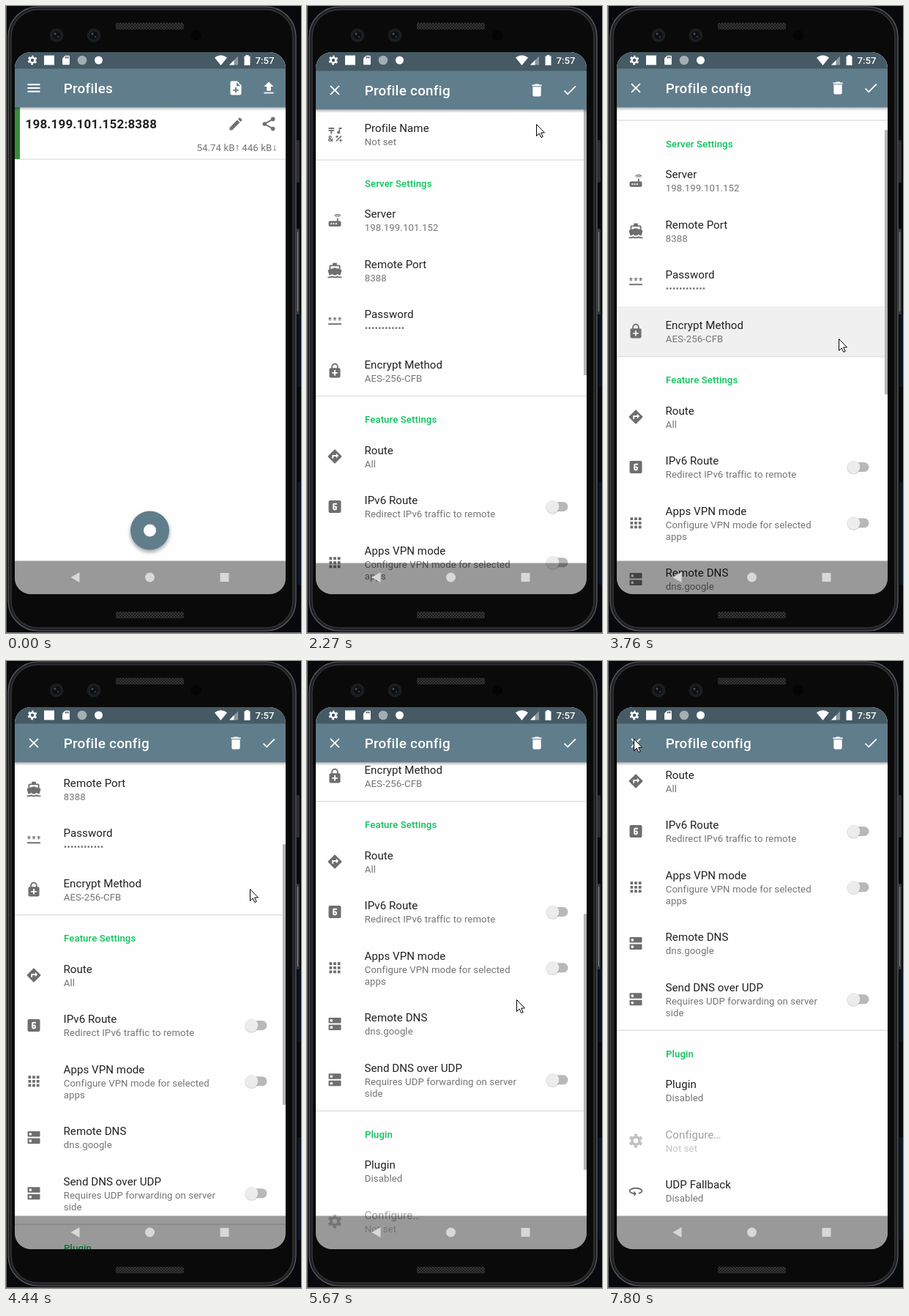
An HTML page that plays this animation: 403 by 856 pixels, repeating every 8 s.

```html
<!DOCTYPE html>
<html lang="en">
<head>
<meta charset="utf-8">
<title>Profile config</title>
<style>
html, body { margin: 0; width: 100%; height: 100%; overflow: hidden; background: #08090c; }
svg { display: block; width: 403px; height: 856px; }
text { font-family: Roboto, sans-serif; white-space: pre; }
.bar { font-size: 18.84px; font-weight: 500; letter-spacing: .27px; fill: #fff; }
.title { font-size: 15.07px; letter-spacing: .06px; fill: #212121; }
.sub { font-size: 13.19px; letter-spacing: .09px; fill: #757575; }
.head { font-size: 13.19px; font-weight: 500; letter-spacing: .1px; fill: #0cc15b; }
.host { font-size: 17px; font-weight: 700; letter-spacing: .2px; fill: #212121; }
.time { font-size: 13.2px; font-weight: 500; fill: #fff; }
</style>
</head>
<body>
<svg id="stage" viewBox="0 0 403 856"></svg>
<script>
// Icons on a 24-unit grid: path data, or markup when it starts with "<"
const icons = {
  menu: 'M3 18h18v-2H3zm0-5h18v-2H3zm0-7v2h18V6z',
  close: 'M19 6.41L17.59 5 12 10.59 6.41 5 5 6.41 10.59 12 5 17.59 6.41 19 12 13.41 17.59 19 19 17.59 13.41 12z',
  trash: 'M6 19c0 1.1.9 2 2 2h8c1.1 0 2-.9 2-2V7H6zM19 4h-3.5l-1-1h-5l-1 1H5v2h14z',
  check: 'M9 16.17L4.83 12l-1.42 1.41L9 19 21 7l-1.41-1.41z',
  add: 'M14 2H6c-1.1 0-2 .9-2 2v16c0 1.1.9 2 2 2h12c1.1 0 2-.9 2-2V8zm2 14h-3v3h-2v-3H8v-2h3v-3h2v3h3zm-3-7V3.5L18.5 9z',
  upload: 'M9 16h6v-6h4l-7-7-7 7h4zm-4 2h14v2H5z',
  edit: 'M3 17.25V21h3.75L17.81 9.94l-3.75-3.75zM20.71 7.04c.39-.39.39-1.02 0-1.41l-2.34-2.34c-.39-.39-1.02-.39-1.41 0l-1.83 1.83 3.75 3.75z',
  share: '<path d="M18 5L6 12l12 7" fill="none" stroke="currentColor" stroke-width="2"/><circle cx="18" cy="5" r="3"/><circle cx="6" cy="12" r="3"/><circle cx="18" cy="19" r="3"/>',
  gear: '<g fill="none" stroke="currentColor"><circle cx="12" cy="12" r="5.4" stroke-width="3.9"/><circle cx="12" cy="12" r="8.4" stroke-width="3.2" stroke-dasharray="4.4 4.396" stroke-dashoffset="2.2" transform="rotate(-90 12 12)"/></g>',
  card: 'M18 2h-8L4 8v12c0 1.1.9 2 2 2h12c1.1 0 2-.9 2-2V4c0-1.1-.9-2-2-2zm-6 6h-2V4h2zm3 0h-2V4h2zm3 0h-2V4h2z',
  symbols: '<path d="M3 2h8v2H3zM6 11V7H3V5h8v2H8v4zM18 2h4v2h-2.5v5H18z"/><circle cx="17.5" cy="8.8" r="2.2"/><path d="M14 21.5l7.5-7.5" stroke="currentColor" stroke-width="1.6"/><circle cx="15.2" cy="15" r="1.6"/><circle cx="20.5" cy="20.5" r="1.6"/><text x="2" y="22" font-size="12" font-weight="700">&amp;</text>',
  router: 'M20.2 5.9l.8-.8C19.6 3.7 17.8 3 16 3s-3.6.7-5 2.1l.8.8C13 4.8 14.5 4.2 16 4.2s3 .6 4.2 1.7zm-.9.8c-.9-.9-2.1-1.4-3.3-1.4s-2.4.5-3.3 1.4l.8.8c.7-.7 1.6-1 2.5-1s1.8.3 2.5 1zM19 13h-2V9h-2v4H5c-1.1 0-2 .9-2 2v4c0 1.1.9 2 2 2h14c1.1 0 2-.9 2-2v-4c0-1.1-.9-2-2-2zM8 18H6v-2h2zm3.5 0h-2v-2h2zm3.5 0h-2v-2h2z',
  boat: 'M20 21c-1.39 0-2.78-.47-4-1.32-2.44 1.71-5.56 1.71-8 0C6.78 20.53 5.39 21 4 21H2v2h2c1.38 0 2.74-.35 4-.99 2.52 1.29 5.48 1.29 8 0 1.26.65 2.62.99 4 .99h2v-2zM3.95 19H4c1.6 0 3.02-.88 4-2 .98 1.12 2.4 2 4 2s3.02-.88 4-2c.98 1.12 2.4 2 4 2l1.94-6.68c.1-.6-.2-1.1-.66-1.28L20 10.62V6c0-1.1-.9-2-2-2h-3V1H9v3H6c-1.1 0-2 .9-2 2v4.62l-1.29.42c-.5.2-.8.7-.66 1.28zM6 6h12v3.97L12 8 6 9.97z',
  stars: '<path d="M2.5 16h19v2h-19z"/><g fill="none" stroke="currentColor" stroke-width="1.2">' +
    [5, 12, 19].map(x => `<path d="M${x} 7v5M${x - 2.2} 8.3l4.4 2.5m0-2.5l-4.4 2.5"/>`).join('') + '</g>',
  lock: 'M18 8h-1V6c0-2.76-2.24-5-5-5S7 3.24 7 6v2H6c-1.1 0-2 .9-2 2v10c0 1.1.9 2 2 2h12c1.1 0 2-.9 2-2V10c0-1.1-.9-2-2-2zM8.9 6c0-1.71 1.39-3.1 3.1-3.1s3.1 1.39 3.1 3.1v2H8.9zM16 16h-3v3h-2v-3H8v-2h3v-3h2v3h3z',
  route: 'M21.71 11.29l-9-9c-.39-.39-1.02-.39-1.41 0l-9 9c-.39.39-.39 1.02 0 1.41l9 9c.39.39 1.02.39 1.41 0l9-9c.39-.38.39-1.01 0-1.41zM14 14.5V12h-4v3H8v-4c0-.55.45-1 1-1h5V7.5l3.5 3.5z',
  six: 'M11 15h2v-2h-2zm8-12H5c-1.1 0-2 .9-2 2v14c0 1.1.9 2 2 2h14c1.1 0 2-.9 2-2V5c0-1.1-.9-2-2-2zm-4 6h-4v2h2c1.1 0 2 .89 2 2v2c0 1.11-.9 2-2 2h-2c-1.1 0-2-.89-2-2V9c0-1.11.9-2 2-2h4z',
  apps: [4, 10, 16].map(x => [4, 10, 16].map(y => `M${x} ${y}h4v4h-4z`).join('')).join(''),
  dns: [3, 13].map(y => `M4 ${y}h16q1 0 1 1v6q0 1-1 1H4q-1 0-1-1v-6q0-1 1-1zM7 ${y + 6}a2 2 0 1 1 0-4 2 2 0 0 1 0 4z`).join(''),
  loop: 'M12 7C6.48 7 2 9.24 2 12c0 2.24 2.94 4.13 7 4.77V20l4-4-4-4v2.73c-3.15-.56-5-1.9-5-2.73 0-1.06 3.04-3 8-3s8 1.94 8 3c0 .73-1.46 1.89-4 2.53v2.05c3.53-.77 6-2.53 6-4.58 0-2.76-4.48-5-10-5z'
};

const rect = (x, y, w, h, fill, more = '') =>
  `<rect x="${x}" y="${y}" width="${w}" height="${h}" fill="${fill}" ${more}/>`;
const circle = (x, y, r, fill, more = '') =>
  `<circle cx="${x}" cy="${y}" r="${r}" fill="${fill}" ${more}/>`;
const text = (cls, x, y, s) => `<text class="${cls}" x="${x}" y="${y}">${s}</text>`;
const icon = (name, x, y, color = '#fff', scale = .942) => {
  const body = icons[name];
  return `<g transform="translate(${x} ${y}) scale(${scale}) translate(-12 -12)" fill="${color}" color="${color}">` +
    (body[0] === '<' ? body : `<path fill-rule="evenodd" d="${body}"/>`) + '</g>';
};

// Preference rows; y is the middle of the title line before scrolling
const header = (y, s) => text('head', 79, y + 4.7, s);
const divider = y => rect(12, y - .5, 370, 1.2, '#dcdcdc');
const toggle = y => rect(329, y - 6.5, 27.5, 13, '#b8b8b8', 'rx="6.5"') +
  circle(335.5, y + .8, 9.3, '#000', 'opacity=".16"') + circle(335.5, y, 9, '#ececec');
function row(y, name, title, sub, { wrap, on, off } = {}) {
  const mid = y + (wrap ? 16.3 : 8.5);
  return `<g ${off ? 'opacity=".42"' : ''}>` +
    (name ? icon(name, 38, mid, '#6e6e6e') : '') +
    text('title', 78.5, y + 5.3, title) + text('sub', 78.8, y + 23.4, sub) +
    (wrap ? text('sub', 78.8, y + 39.4, wrap) : '') + (on ? toggle(mid) : '') + '</g>';
}
const prefs =
  rect(12, 461, 370, 68, '#f0f0f0', 'id="press"') +
  row(164, 'symbols', 'Profile Name', 'Not set') + divider(207) +
  header(239, 'Server Settings') +
  row(281, 'router', 'Server', '198.199.101.152') +
  row(349.5, 'boat', 'Remote Port', '8388') +
  row(418, 'stars', 'Password', '•'.repeat(12)) +
  row(486.5, 'lock', 'Encrypt Method', 'AES-256-CFB') + divider(529.5) +
  header(561.5, 'Feature Settings') +
  row(603.5, 'route', 'Route', 'All') +
  row(672, 'six', 'IPv6 Route', 'Redirect IPv6 traffic to remote', { on: true }) +
  row(740.5, 'apps', 'Apps VPN mode', 'Configure VPN mode for selected', { wrap: 'apps', on: true }) +
  row(825, 'dns', 'Remote DNS', 'dns.google') +
  row(893.5, 'dns', 'Send DNS over UDP', 'Requires UDP forwarding on server', { wrap: 'side', on: true }) +
  divider(952) + header(984, 'Plugin') +
  row(1026, '', 'Plugin', 'Disabled') +
  row(1094.5, 'gear', 'Configure…', 'Not set', { off: true }) +
  row(1163, 'loop', 'UDP Fallback', 'Disabled');

const toolbar = (left, title, a, b) =>
  rect(12, 138, 370, 5, 'url(#shade)') + rect(12, 85, 370, 53.3, '#607d8b') + rect(12, 60, 370, 25.5, '#455a64') +
  icon(left, 38, 112) + text('bar', 78.7, 119, title) + icon(a, 314, 112) + icon(b, 359, 112);
const navBack = rect(12, 757.5, 370, 50, '#000', 'opacity=".4"');
const arrow = (x, up) =>
  `<path d="M${x} 190v7.5m-1.6-${up ? 5.9 : 1.6}l1.6 ${up ? -1.6 : 1.6} 1.6 ${up ? 1.6 : -1.6}" fill="none" stroke="#858585" stroke-width=".9"/>`;

const profiles = rect(12, 63, 370, 745, '#fefefe') +
  rect(12, 138, 370, 71, '#fff') + rect(12, 208.6, 370, 1.2, '#dcdcdc') + rect(12, 138, 7, 71, '#388e3c') +
  toolbar('menu', 'Profiles', 'add', 'upload') +
  text('host', 26.5, 167, '198.199.101.152:8388') +
  circle(314, 156, 10, '#000', 'id="ripple" opacity=".12"') +
  icon('edit', 314, 161, '#707070') + icon('share', 359, 161, '#707070') +
  text('sub', 260.5, 197.5, '54.74 kB') + arrow(316, true) +
  text('sub', 322.3, 197.5, '446 kB') + arrow(367, false) +
  circle(196.5, 719, 27, '#000', 'opacity=".32" filter="url(#blur)"') +
  circle(196.5, 716, 26.5, '#607d8b') + circle(196.5, 716, 8.5, '#fff') + navBack;

const config = rect(12, 60, 370, 750, '#fefefe') + `<g id="list">${prefs}</g>` +
  rect(378, 0, 4, 10, '#b4b4b4', 'id="thumb"') +
  toolbar('close', 'Profile config', 'trash', 'check') + navBack;

const status =
  icon('gear', 36, 74, '#fff', .64) + rect(52, 67.5, 14, 13, '#fff') + icon('card', 82, 74, '#fff', .62) +
  circle(104, 74, 6.3, '#a3afb4') + circle(126.5, 74, 5.5, '#fff') +
  '<path d="M285 70.5q8.5-6.5 17 0L293.5 81z" fill="#fff"/>' +
  '<path d="M305 80.5h12v-12z" fill="#8b999f"/><path d="M305 80.5h6.5V74z" fill="#fff"/>' +
  '<path d="M325.5 68.5h2V67h4v1.5h2V81h-8z" fill="#fff"/>' + text('time', 340.6, 79, '7:57');

const navKeys = '<path d="M88.5 780l12-7v14z" fill="#d8d8d8"/>' +
  circle(196.5, 780, 6.5, '#d8d8d8') + rect(292.5, 774, 12, 12, '#d8d8d8');

const lens = x => circle(x, 40, 9.5, '#1b1d20') + circle(x, 40, 5.5, '#0c0f13') +
  circle(x - 2, 38, 1.6, '#4a5058') + circle(x + 2, 42, 1.2, '#3a4048');
const speaker = y => rect(150, y, 93, 9, '#1b1b1b', 'rx="2"') + rect(150, y, 93, 9, 'url(#mesh)', 'rx="2"');
const rim = (inset, color, width) =>
  rect(2 + inset, inset, 395 - 2 * inset, 854 - 2 * inset, 'none', `rx="${42 - inset}" stroke="${color}" stroke-width="${width}"`);
const phone = rect(0, 0, 403, 856, '#08090c') + rect(398, 420, 5, 100, '#0a1322') +
  rect(398, 650, 5, 140, '#0b1628') + rect(0, 0, 1, 856, '#666') +
  rect(396, 183, 5, 58, '#2c2d30', 'rx="1.5"') + rect(396, 304, 5, 117, '#36373a', 'rx="1.5"') +
  rect(398, 308, 1, 109, '#8b8c8e') +
  rect(2, 0, 395, 854, '#0a0a0a', 'rx="42"') +
  rim(3, '#1f2022', 5) + rim(1, '#5c5d60', 1.2) + rim(5, '#3e3f42', 1) +
  rect(0, 855, 403, 1, '#777') +
  lens(69) + lens(120) + circle(260, 40, 7, '#040404') + speaker(23) + speaker(827);

document.getElementById('stage').innerHTML = `<defs>
  <linearGradient id="shade" x2="0" y2="1"><stop stop-opacity=".3"/><stop offset="1" stop-opacity="0"/></linearGradient>
  <filter id="blur" x="-30%" y="-30%" width="160%" height="160%"><feGaussianBlur stdDeviation="2.5"/></filter>
  <pattern id="mesh" width="4" height="4" patternUnits="userSpaceOnUse"><path d="M0 0l4 4M4 0L0 4" stroke="#3c3c3c" stroke-width=".8"/></pattern>
  <clipPath id="glass">${rect(12, 63, 370, 740, '#fff', 'rx="22"')}</clipPath></defs>` +
  phone + `<g clip-path="url(#glass)">${rect(12, 63, 370, 22, '#455a64')}` +
  `<g id="home">${profiles}</g><g id="config">${config}</g>${status}${navKeys}</g>` +
  '<path id="cursor" d="M.5.5v16L4.2 13l2.6 5.5 2.4-1.1L6.7 12h4.8z" fill="#fff" stroke="#000"/>';

const $ = id => document.getElementById(id);
const set = (id, attrs) => { for (const k in attrs) $(id).setAttribute(k, attrs[k]); };
const show = (id, on) => { $(id).style.display = on ? '' : 'none'; };

const ticks = [0, 680, 840, 980, 1130, 1260, 1970, 2270, 2390, 2820, 2970, 3090, 3220, 3480, 3600, 3760,
  3900, 4020, 4170, 4320, 4440, 4590, 4710, 4830, 4980, 5100, 5250, 5370, 5520, 5670, 5820, 5940,
  6090, 6240, 6360, 6750, 6880, 7170, 7290, 7410, 7560, 7680, 7800];
// time, x, y
const pointer = [[680, 255, 88], [840, 185, 106], [980, 318, 166], [1130, 309, 163], [1260, 313, 161],
  [2390, 313, 161], [2820, 303, 311], [3220, 310, 521], [3480, 311, 515], [3760, 315, 454],
  [4440, 333, 311], [4590, 332, 296], [5100, 304, 442], [5370, 289, 573], [5670, 286, 462],
  [6240, 309, 323], [6360, 309, 323], [6750, 313, 299], [6880, 305, 303], [7410, 24, 117], [7800, 35, 106]];
// time, offset
const scroll = [[3480, 0], [3760, 51], [4440, 183], [4590, 207], [4830, 230], [5100, 240], [5370, 240],
  [5520, 278], [5670, 338], [5940, 407], [6090, 434], [6240, 448]];

function at(keys, t) {
  const i = keys.findIndex(k => k[0] > t);
  if (i < 0) return keys[keys.length - 1].slice(1);
  if (!i) return keys[0].slice(1);
  const a = keys[i - 1], b = keys[i], p = (t - a[0]) / (b[0] - a[0]);
  return a.slice(1).map((v, n) => v + (b[n + 1] - v) * p);
}

function draw(now) {
  const time = now % 8000;
  const t = ticks.filter(k => k <= time).pop();
  const [x, y] = at(pointer, t), [s] = at(scroll, t);
  const open = t >= 2270;
  show('home', !open);
  show('config', open);
  show('ripple', t === 1970);
  show('cursor', t >= 680);
  set('cursor', { transform: `translate(${x} ${y})` });
  set('config', { transform: `translate(0 ${t === 2270 ? 3 : 0})` });
  set('list', { transform: `translate(0 ${-s})` });
  set('press', { opacity: t < 3480 || t > 3900 ? 0 : t === 3900 ? .5 : 1 });
  set('thumb', {
    y: 138 + s * .613,
    height: 363 - s * .04,
    opacity: Math.max(0, Math.min(1, (7410 - t) / 360))
  });
  requestAnimationFrame(() => draw(performance.now() - start));
}
const start = performance.now();
draw(0);
</script>
</body>
</html>
```
